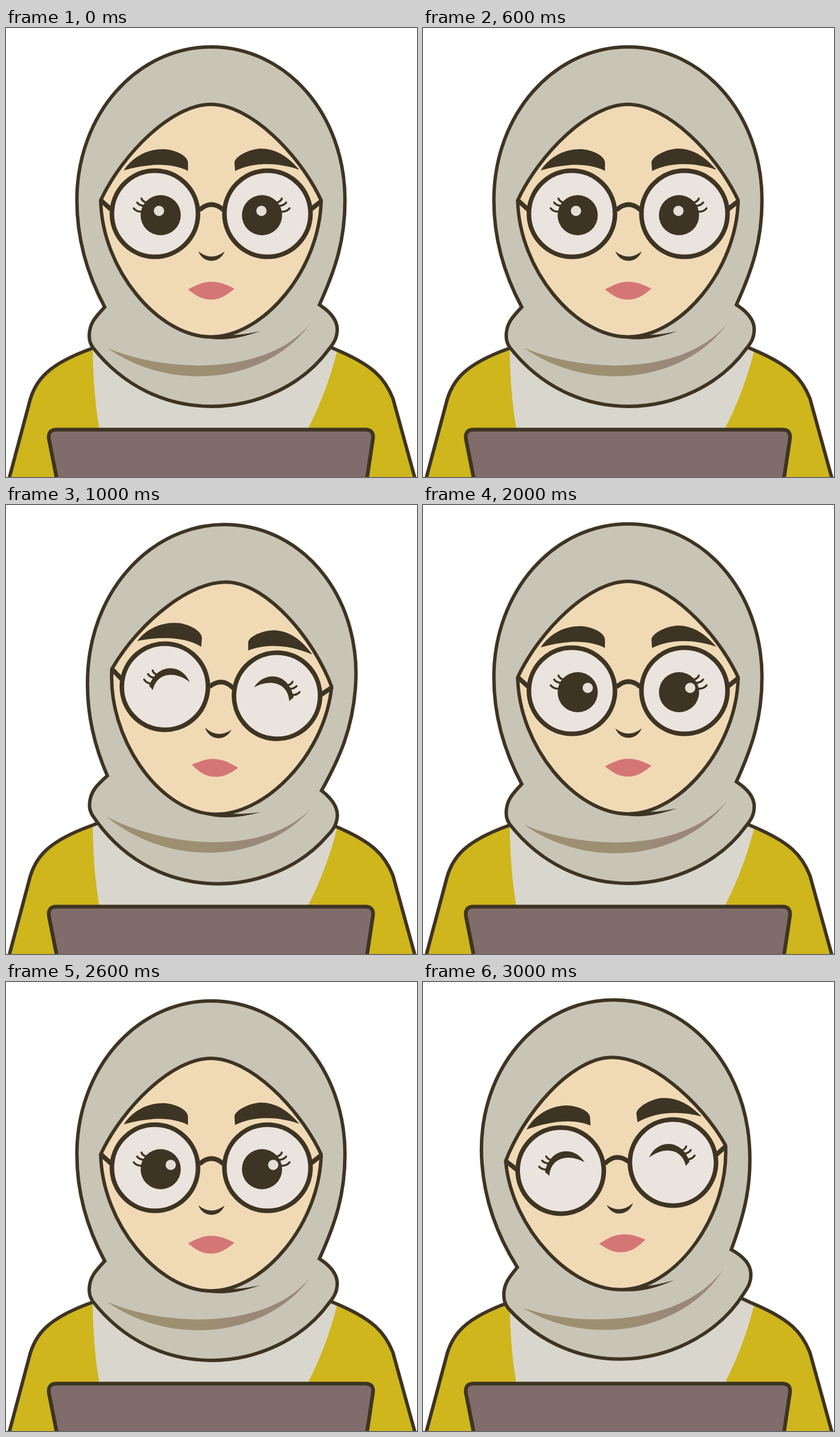
An HTML page for the animation above (4 s loop, 716 by 782 pixels).

```html
<!DOCTYPE html>
<html lang="en">
<head>
<meta charset="utf-8">
<title>Nodding woman with laptop</title>
<style>
  html, body { margin: 0; height: 100%; overflow: hidden; background: #fff; }
  svg { display: block; width: 100vw; height: 100vh; }
  .line { fill: none; stroke: #3e3423; stroke-width: 6; }
  .ink { fill: #3e3423; }
  .lash { fill: none; stroke: #3e3423; stroke-width: 3.5; stroke-linecap: round; }
</style>
</head>
<body>
<svg viewBox="0 0 716 782">
  <defs>
    <linearGradient id="fold">
      <stop offset=".45" stop-color="#9d9072"/>
      <stop offset=".75" stop-color="#99877a"/>
    </linearGradient>
    <path id="lid" class="ink" d="M302 312C286 281 243 282 232 324L239 331C244 298 277 295 302 312Z"/>
    <path id="lashes" class="lash" d="M222.500 314Q227 320 236 320M228.500 304Q232 309 241 310M236 297Q237 301 244 304"/>
  </defs>

  <!-- body -->
  <path fill="#cfb61c" d="M4 790L40 655C50 612 75 585 150 558L200 538H528L570 558C640 587 660 610 674 645L714 790Z"/>
  <path fill="#d9d6ce" d="M151 558Q152 640 163 700H525C548 655 565 610 577 562L528 538H200Z"/>
  <path class="line" d="M4 790L40 655C50 612 75 585 150 558L200 538M528 538L570 558C640 587 660 610 674 645L714 790"/>
  <path class="line" style="fill:#806c6a;stroke-width:6.500" d="M89.500 790L75 717C73 706 77 699.500 88 699.500H626C637 699.500 641 706 639 717L628 790"/>

  <g id="head">
    <path class="line" style="fill:#c9c5b6" d="M172 486C142 430 123.500 370 123.500 300C123.500 150 228 33 357.500 33C488 33 590.500 150 590.500 300C590.500 370 574 420 546 482C563 493 577 508 577 525C577 540 571 549 562 560C517 622 437 659 358 659C280 659 205 625 151 556C148 551 145 546 145 536C145 514 157 502 172 486Z"/>
    <path fill="url(#fold)" d="M176 557C270 598 450 610 530 515C455 618 290 637 176 557Z"/>
    <path class="line" style="fill:#f0dab6" stroke-linejoin="round" d="M165 300C203 219 289 133 357 133C425 133 511 219 549 300C547 420 449 538 357 538C265 538 167 420 165 300Z"/>
    <path class="ink" d="M345 539Q385 549 443 528Q405 536 390 534Z"/>

    <path class="ink" d="M205 248C222 222 250 210 277 211C296 213 316 222 317 234V249C290 235 250 235 205 248Z"/>
    <path class="ink" d="M511 247C490 222 468 210 444 210C422 211 399 224 398 234L399 249C430 234 470 233 511 247Z"/>

    <g class="line" style="stroke-width:8">
      <path d="M164 299L184 317M550 301L531 316M337 317Q358 298 379 317"/>
      <circle cx="259.500" cy="323.500" r="75" fill="#ebe3dd"/>
      <circle cx="455.500" cy="323.500" r="75" fill="#ebe3dd"/>
    </g>

    <g id="open">
      <circle class="ink" cx="269.500" cy="326" r="35"/>
      <circle class="ink" cx="446" cy="326" r="35"/>
      <g id="glints" fill="#e5ded7">
        <circle cx="266.500" cy="318.500" r="9"/>
        <circle cx="445" cy="318.500" r="9"/>
      </g>
    </g>
    <g id="closed">
      <use href="#lid"/>
      <use href="#lid" transform="matrix(-1 0 0 1 716.500 0)"/>
    </g>
    <use href="#lashes"/>
    <use href="#lashes" transform="matrix(-1 0 0 1 716.500 0)"/>

    <path class="ink" d="M335 389Q358 407 381 389C372 411 344 411 335 389Z"/>
    <path fill="#d57676" d="M317 455C332 448 342 442 357 442C374 442 384 447 398 454C384 466 372 473 357 473C340 473 329 465 317 455Z"/>
  </g>
</svg>
<script>
  const get = id => document.getElementById(id);
  const poses = [
    { tilt: "", glint: 0 },
    { tilt: "rotate(4.6 355 535.5)", shut: true },
    { tilt: "", glint: 20.5 },
    { tilt: "rotate(-4.1 319 599)", shut: true }
  ];

  function draw(now) {
    const { tilt, glint = 0, shut = false } = poses[Math.floor(now / 1000) % 4];
    get("head").setAttribute("transform", tilt);
    get("glints").setAttribute("transform", `translate(${glint} 0)`);
    get("open").style.display = shut ? "none" : "";
    get("closed").style.display = shut ? "" : "none";
    requestAnimationFrame(draw);
  }
  draw(0);
</script>
</body>
</html>
```
